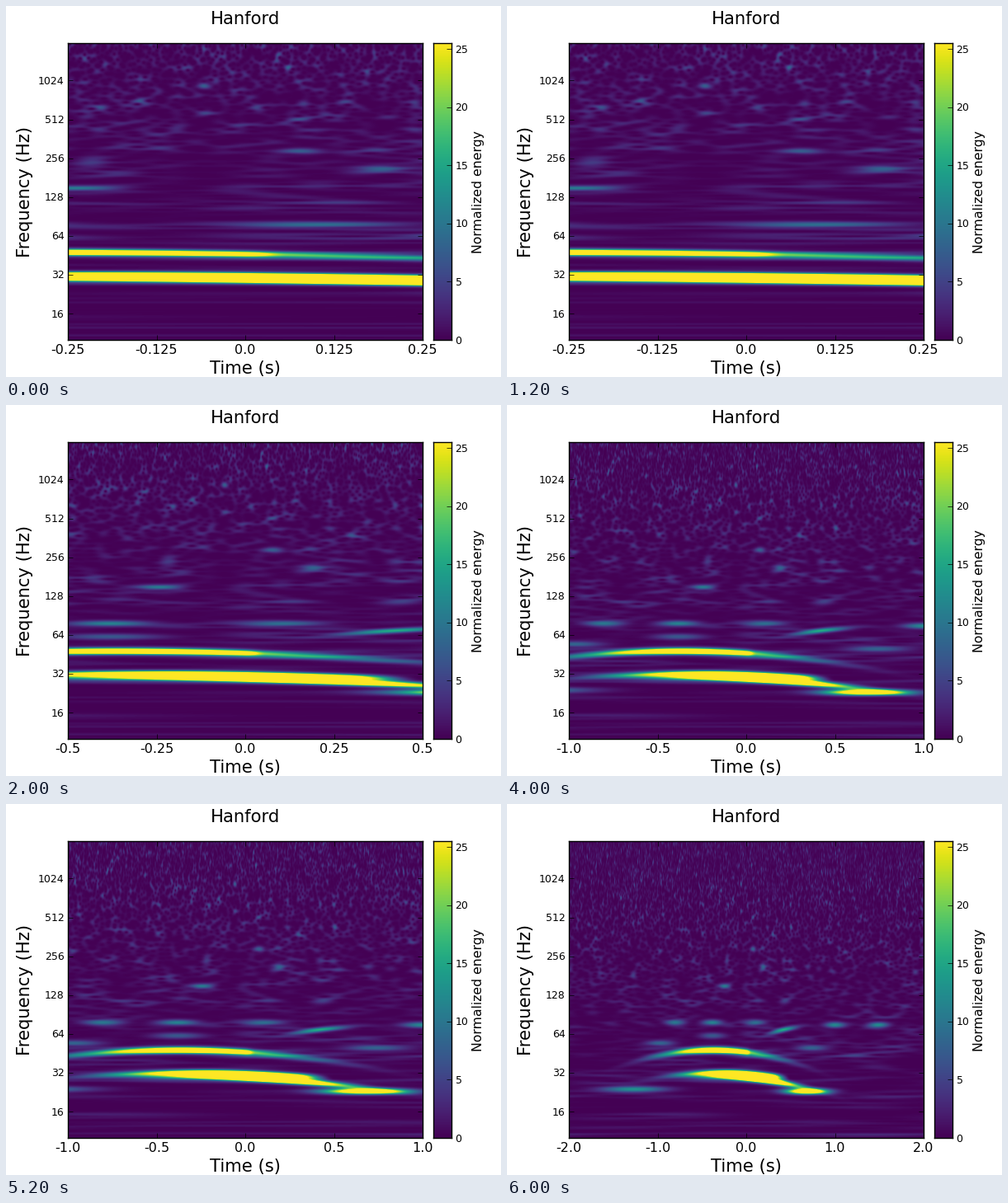
Write a matplotlib script that moves like this. It is 600 by 450 pixels and loops after 8 s.

```python
import numpy as np
import matplotlib.pyplot as plt
from matplotlib.animation import FuncAnimation

plt.rcParams["font.family"] = "DejaVu Sans"

WIDTH, HEIGHT = 600, 450
LEFT, TOP, COLS, ROWS = 75, 45, 430, 360
BOTTOM = TOP + ROWS
FMIN, FMAX, EMAX = 10, 2000, 25.5
ZOOMS = 4
FIRST_SPAN = 0.25
LAST_SPAN = FIRST_SPAN * 2 ** (ZOOMS - 1)
STEPS = COLS * 2 ** (ZOOMS - 1)

times = ((np.arange(STEPS) + 0.5) / STEPS * 2 - 1) * LAST_SPAN
rows = np.arange(ROWS) + TOP + 0.5


def row_to_freq(row):
    return FMIN * (FMAX / FMIN) ** ((BOTTOM - row) / ROWS)


def freq_to_row(freq):
    return BOTTOM - ROWS * np.log(freq / FMIN) / np.log(FMAX / FMIN)


def bell(offset, width):
    return np.exp(-0.5 * (offset / width) ** 2)


def fade(start, end, drop):
    """Smooth fall from 1 to 1 - drop between two times."""
    x = np.clip((times - start) / (end - start), 0, 1)
    return 1 - drop * x * x * (3 - 2 * x)


def noise_energy():
    """Constant-Q energy of white noise over the widest span."""
    rng = np.random.default_rng(14)
    resolution = 1 / (2 * LAST_SPAN)
    bins = np.arange(0, 2 * FMAX, resolution)
    spectrum = rng.normal(size=bins.size) + 1j * rng.normal(size=bins.size)
    energy = np.empty((ROWS, STEPS))
    widths = np.linspace(0.036, 0.021, ROWS)
    for i, (freq, width) in enumerate(zip(row_to_freq(rows), widths)):
        near = np.flatnonzero(abs(bins - freq) < 4 * width * freq)
        weight = bell(bins[near] - freq, width * freq)
        baseband = np.zeros(STEPS, complex)
        baseband[(near - round(freq / resolution)) % STEPS] = (
            spectrum[near] * weight)
        energy[i] = abs(np.fft.ifft(baseband) * STEPS) ** 2
        energy[i] /= 2 * np.sum(weight ** 2)
    return energy * np.linspace(0.9, 0.5, ROWS)[:, None]


def arc(apex, row, curl, time, duration, thickness, peak):
    """Ridge along a parabola, strongest at the given time."""
    path = row + curl * (times - apex) ** 2
    strength = peak * bell(times - time, duration)
    return strength * bell(rows[:, None] - path, thickness)


def spot(time, row, peak):
    return arc(time, row, 0, time, 6 / row_to_freq(row), 2.4, peak)


SPOTS = [
    (-0.38, 265, 11), (-0.8, 265, 10), (0.1, 265, 9), (1.0, 268, 12),
    (1.49, 268, 12), (-0.38, 281, 7), (0.74, 296, 8), (-0.97, 290, 8),
    (-1.27, 346, 13), (-0.25, 221, 8), (-0.058, 97, 7), (0.08, 176, 6),
    (0.19, 197, 6),
]


def build_energy():
    energy = noise_energy()
    energy += arc(-0.38, 298.5, 18, -0.27, 0.42, 2.6, 42) * fade(0, 0.06, 0.35)
    energy += arc(-0.3, 326, 12, -0.05, 0.42, 2.4, 46) * fade(0.3, 0.5, 1)
    energy += arc(-0.4, 330.5, 12, 0.1, 0.32, 2.4, 55)
    energy += arc(0.68, 348.5, 0, 0.68, 0.16, 2.4, 38)
    energy += arc(0.9, 268, 25, 0.42, 0.1, 2, 15)
    for key in SPOTS:
        energy += spot(*key)
    return energy


def view(zoom):
    """Average the middle of the map down to one value per column."""
    factor = 2 ** zoom
    start = (STEPS - COLS * factor) // 2
    part = energy[:, start:start + COLS * factor]
    return part.reshape(ROWS, COLS, factor).mean(axis=2)


def pixel_axes(x, width):
    ax = fig.add_axes([x / WIDTH, 1 - BOTTOM / HEIGHT,
                       width / WIDTH, ROWS / HEIGHT])
    ax.tick_params(direction="in", length=4, width=0.5,
                   labelleft=False, labelbottom=False)
    for spine in ax.spines.values():
        spine.set_linewidth(1)
    return ax


def label(x, y, text, size, ha="center", rotation=0):
    return fig.text(x / WIDTH, 1 - y / HEIGHT, text, size=size, ha=ha,
                    va="baseline", rotation=rotation, rotation_mode="anchor")


energy = build_energy()
fig = plt.figure(figsize=(6, 4.5), dpi=100, facecolor="white")

ax = pixel_axes(LEFT, COLS)
image = ax.imshow(view(0), cmap="viridis", vmin=0, vmax=EMAX, aspect="auto",
                  interpolation="nearest", extent=(0, COLS, BOTTOM, TOP))
ax.tick_params(top=True, right=True)
ax.set_xticks(np.linspace(0, COLS, 5))
octaves = 2 ** np.arange(4, 11)
ax.set_yticks(freq_to_row(octaves))
for octave in octaves:
    label(70.5, freq_to_row(octave) + 4.5, str(octave), 9, "right")

bar = pixel_axes(518, 22)
bar.imshow(np.linspace(0, 1, 256)[:, None], cmap="viridis", aspect="auto",
           origin="lower", extent=(0, 1, 0, EMAX))
bar.tick_params(left=False, right=True)
bar.set_xticks([])
bar.set_yticks(range(0, 26, 5))
for value in range(0, 26, 5):
    label(544.5, BOTTOM - value / EMAX * ROWS + 4.5, str(value), 9, "left")

label(290, 22, "Hanford", 15.2)
label(290, 446, "Time (s)", 15.2)
label(29, 225, "Frequency (Hz)", 15.2, rotation=90)
label(577.5, 225, "Normalized energy", 11.3, rotation=90)
time_labels = [label(LEFT + COLS * i / 4, 421.5, "", 11.5) for i in range(5)]


def update(zoom):
    image.set_data(view(zoom))
    span = FIRST_SPAN * 2 ** zoom
    for text, value in zip(time_labels, np.linspace(-span, span, 5)):
        text.set_text(str(float(value)))
    return [image, *time_labels]


anim = FuncAnimation(fig, update, frames=ZOOMS, interval=2000,
                     repeat=True, repeat_delay=0)
plt.show()
```
